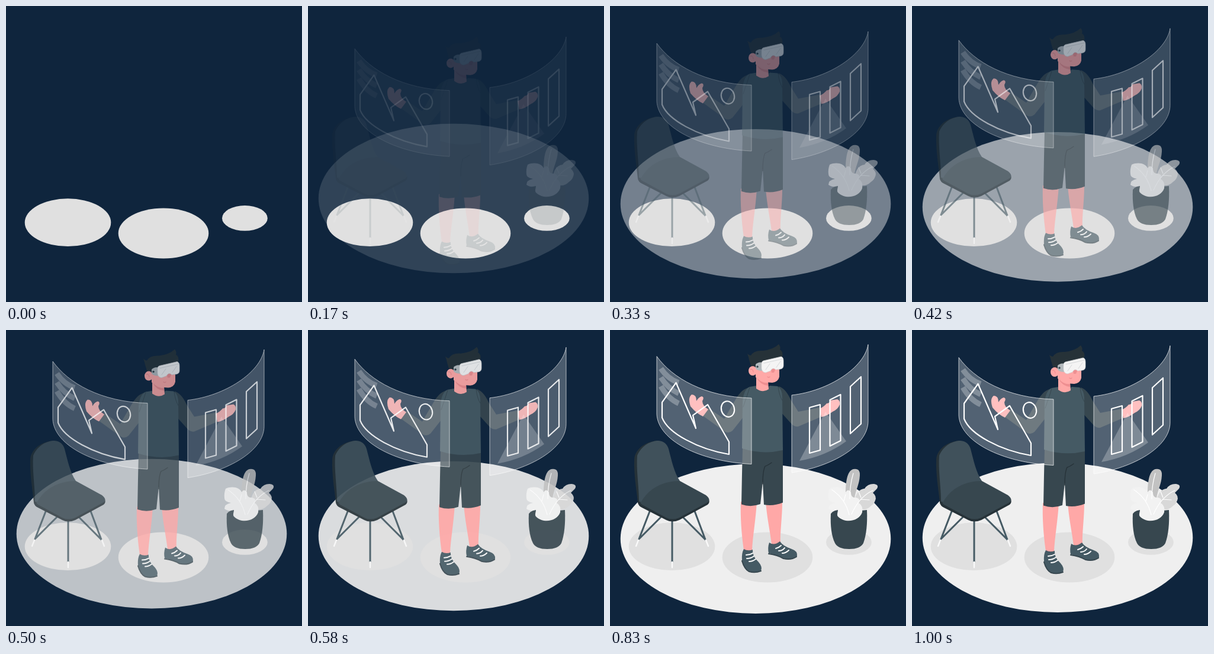
An HTML page for the animation above (1040 ms loop, 500 px wide and 500 px high).

```html
<!DOCTYPE html>
<html lang="en">
<head>
<meta charset="utf-8">
<title>Virtual reality scene</title>
<style>
  html, body { margin: 0; width: 100%; height: 100%; overflow: hidden; background: #0f253d; }
  svg { display: block; width: 100vw; height: 100vh; }
  .line { fill: none; stroke-linecap: round; stroke-linejoin: round; }
  .skin { fill: #ffa8a7; }
  .slate { fill: #455a64; }
  .deep { fill: #37474f; }
  .ink { fill: #263238; }
  .glass { fill: #fff; fill-opacity: .28; stroke: #fff; stroke-opacity: .7; }
  .draw { stroke: #fff; stroke-width: 2.2; }
</style>
</head>
<body>
<svg viewBox="0 0 500 500">
  <ellipse class="fade down" cx="246" cy="350.7" rx="228.3" ry="126.3" fill="#efefef"/>

  <g fill="#e0e0e0">
    <ellipse cx="104.5" cy="365.7" rx="72.8" ry="40.4"/>
    <ellipse cx="266" cy="384" rx="76.3" ry="42.4"/>
    <ellipse cx="403.4" cy="358.4" rx="38.4" ry="21.4"/>
  </g>

  <g class="fade">
    <!-- chair -->
    <g class="line" stroke="#455a64" stroke-width="3">
      <path d="M105 320V391M68 304L49 353M88 314L50 352M124 317L161 354M143 306L161 354"/>
      <path stroke="#fafafa" stroke-width="2.4" d="M105 392V401M48 355L44 365M162 355L166 365"/>
    </g>
    <path class="ink" d="M82 187C65 187 43 198 41 218C40 245 45 270 47 292Q48 297 54 300L95 321Q105 326 117 321L165 295Q169 292 167 286L118 257L100 240Z"/>
    <path class="deep" d="M52 285C60 268 85 252 118 255L162 279Q171 286 165 291L117 317Q105 322 95 317L54 295Q49 292 52 285Z"/>
    <path fill="#40515b" d="M46 212C54 194 70 187 82 187Q95 188 99 201C104 220 108 240 118 255C90 255 66 267 53 290L49 290C49 265 44 235 46 212Z"/>

    <!-- plant -->
    <path class="deep" d="M373 310C372 330 374 348 380 360Q385 370 404 370Q423 370 428 360C433 346 435 328 434 304Z"/>
    <ellipse class="deep" cx="403.5" cy="312" rx="30.5" ry="11"/>
    <path fill="#c2c2c2" d="M398 278C398 258 400 238 411 235Q423 233 422 246C421 262 415 270 413 284Z"/>
    <path fill="#d8d8d8" d="M414 304C411 282 418 269 430 268Q435 260 445 260Q455 261 451 268L444 275Q451 281 448 288Q446 294 441 297Q434 304 427 303Z"/>
    <path fill="#f2f2f2" d="M371 268C382 263 395 266 398 274Q402 267 407 274C407 282 411 283 414 283Q424 284 420 292Q428 297 426 308C421 323 398 327 386 316C382 313 385 308 385 304Q375 307 369 302Q369 294 380 292Q369 290 369 284Q368 276 371 268Z"/>
    <path class="line" stroke="#fff" stroke-width="1.2" d="M411 242Q405 262 405 285M404 312C400 295 390 280 375 270M395 289L398 278M408 311C415 295 425 280 444 271M424 283L420 273M423 286L438 287"/>
  </g>

  <!-- person -->
  <g class="fade up">
    <path class="skin" d="M221 292C220 316 222 346 226 374Q233 378 240 374C241 350 246 325 248 292ZM263 292C265 318 270 340 273 364Q280 368 288 362C287 345 291 318 291 292Z"/>
    <path class="slate" d="M226 372Q233 376 241 373Q240 384 251 394Q258 402 255 409Q241 415 231 408Q225 402 223 391Q222 379 226 372Z"/>
    <path class="slate" d="M269 361Q277 367 287 359Q292 367 307 372Q317 375 316 384Q309 391 295 389Q283 382 268 379Q266 370 269 361Z"/>
    <path class="line" stroke="#37474f" stroke-width="2" d="M223 392Q227 406 235 410Q245 413 255 409M268 380Q283 382 293 388Q306 391 315 385"/>
    <path class="line" stroke="#fafafa" stroke-width="2" d="M230 382Q236 382 241 379M231 388Q238 388 243 384M235 393Q241 393 246 389M280 371Q285 370 289 366M285 375Q291 375 295 370M291 379Q297 379 302 374"/>

    <path class="deep" d="M224 200H292V260L292 293.500Q276 300 260 297L258 258L254 296Q238 302 222 296.500L223 245Z"/>
    <path class="line" stroke="#263238" stroke-width="1.3" d="M258 262Q258 240 262 232Q266 231 273 226"/>

    <g class="deep">
      <path d="M238 98C220 102 215 115 207 128L193 152L166 134L157 147L193 173Q200 178 207 172L226 148Z"/>
      <path d="M285 97C296 101 301 111 306 121L318 140L355 133L358 148L318 165Q311 166 306 160L288 140Z"/>
    </g>
    <path class="skin" d="M166 136L157 148Q146 143 136 131Q131 116 138 111Q146 111 146 122Q150 115 155 114Q160 115 156 122Q156 130 166 136Z"/>
    <path class="skin" d="M354 135Q361 132 366 126Q371 126 372 121L384 119Q389 121 388 128Q385 136 376 140Q367 147 357 149Z"/>

    <path class="slate" d="M236 98L248 96Q259 106 270 96L283 97Q291 102 291 115L292 205Q258 213 223 202L224 122Q226 102 236 98Z"/>
    <path class="line" stroke="#37474f" d="M236 99Q231 115 225 132M284 98Q286 113 291 121"/>

    <path class="skin" d="M247 70V101Q258 109 268 102L267 88Z"/>
    <path fill="#ee8f91" d="M248 83Q258 93 267 91L267 96Q254 95 248 83Z"/>
    <path class="ink" d="M238 62Q235 53 234 48L232 42Q235 45 238 45Q243 36 258 37Q276 35 285 26Q289 31 287 35Q293 38 291 48L284 56L247 69Z"/>
    <path class="skin" d="M246 62L286 53V81Q284 90 274 91Q261 91 246 82Z"/>
    <path class="ink" d="M246 67V48H291L286 52L265 55Q255 53 251 60Z"/>
    <ellipse class="skin" cx="241" cy="71" rx="7" ry="8"/>
    <path class="line" stroke="#ee8f91" stroke-width="1.2" d="M237 68Q242 68 242 73M266 81Q268 83 270 81"/>
    <path fill="#ee8f91" d="M272 69Q275 64 279 69L277 74H273Z"/>
    <path fill="#b4babd" d="M246 60Q251 55 258 57L257 71Q249 71 246 67Z"/>
    <circle class="deep" cx="249" cy="64" r="1.8"/>
    <path fill="#f4f4f4" stroke="#d0d3d5" stroke-width=".7" d="M259 54L289 47Q293 48 293 54V62Q293 67 288 68L280 69Q275 64 271 71L263 74Q257 74 256 67V59Q256 55 259 54Z"/>
    <path class="line" stroke="#d5d8da" stroke-width="1" d="M260 58L291 51M263 69L270 59M281 65L288 55"/>
  </g>

  <!-- floating displays -->
  <g class="fade up">
    <path class="glass" d="M79 46.5C105 83 160 115 239 117V228.5C150 224 81 188 79 144Z"/>
    <path class="glass" d="M307 112C370 105 430 65 436 26.5V156C436 198 374 233 307 243Z"/>
    <path fill="none" stroke="#fff" stroke-opacity=".28" stroke-width="9" d="M86 67Q98 85 116 91M86 82Q98 101 116 109M86 97Q98 118 116 126"/>
    <path fill="#fff" fill-opacity=".25" d="M364 140L399 190Q365 215 320 223Z"/>
    <g class="line draw">
      <path d="M88 124L111.500 91L145 168L140 146L165 128L201 191V212C148 203 98 176 88 150Z"/>
      <ellipse cx="199" cy="135.500" rx="11" ry="13.400" transform="rotate(-15 199 135.500)"/>
      <path d="M337 133L355 128V205L337 210ZM371.500 120L389.500 111V189L371.500 198ZM406 97.500L424 81V160.500L406 177Z"/>
    </g>
  </g>
</svg>
<script>
  const LOOP = 1040, STEPS = 25, SHIFT = 30;
  const all = name => document.querySelectorAll(name);
  const fades = all('.fade'), ups = all('.up'), downs = all('.down');

  const bezier = (a, b, s) => 3 * a * s * (1 - s) ** 2 + 3 * b * s * s * (1 - s) + s ** 3;

  // Easing that overshoots slightly before settling.
  function ease(x) {
    let lo = 0, hi = 1;
    for (let i = 0; i < 24; i++) {
      const mid = (lo + hi) / 2;
      if (bezier(.36, .5, mid) < x) lo = mid; else hi = mid;
    }
    return bezier(-.01, 1.38, lo);
  }

  function move(nodes, y) {
    nodes.forEach(node => node.setAttribute('transform', `translate(0 ${y})`));
  }

  function draw(time) {
    const step = Math.min(STEPS - 1, Math.floor((time % LOOP + 5) * STEPS / LOOP));
    const p = step < 2 ? 0 : ease((step + 1) / STEPS);
    fades.forEach(node => node.setAttribute('opacity', Math.max(0, Math.min(1, p))));
    move(ups, SHIFT * (1 - p));
    move(downs, SHIFT * (p - 1));
  }

  let start;
  function tick(now) {
    start ??= now;
    draw(now - start);
    requestAnimationFrame(tick);
  }
  draw(0);
  requestAnimationFrame(tick);
</script>
</body>
</html>
```
